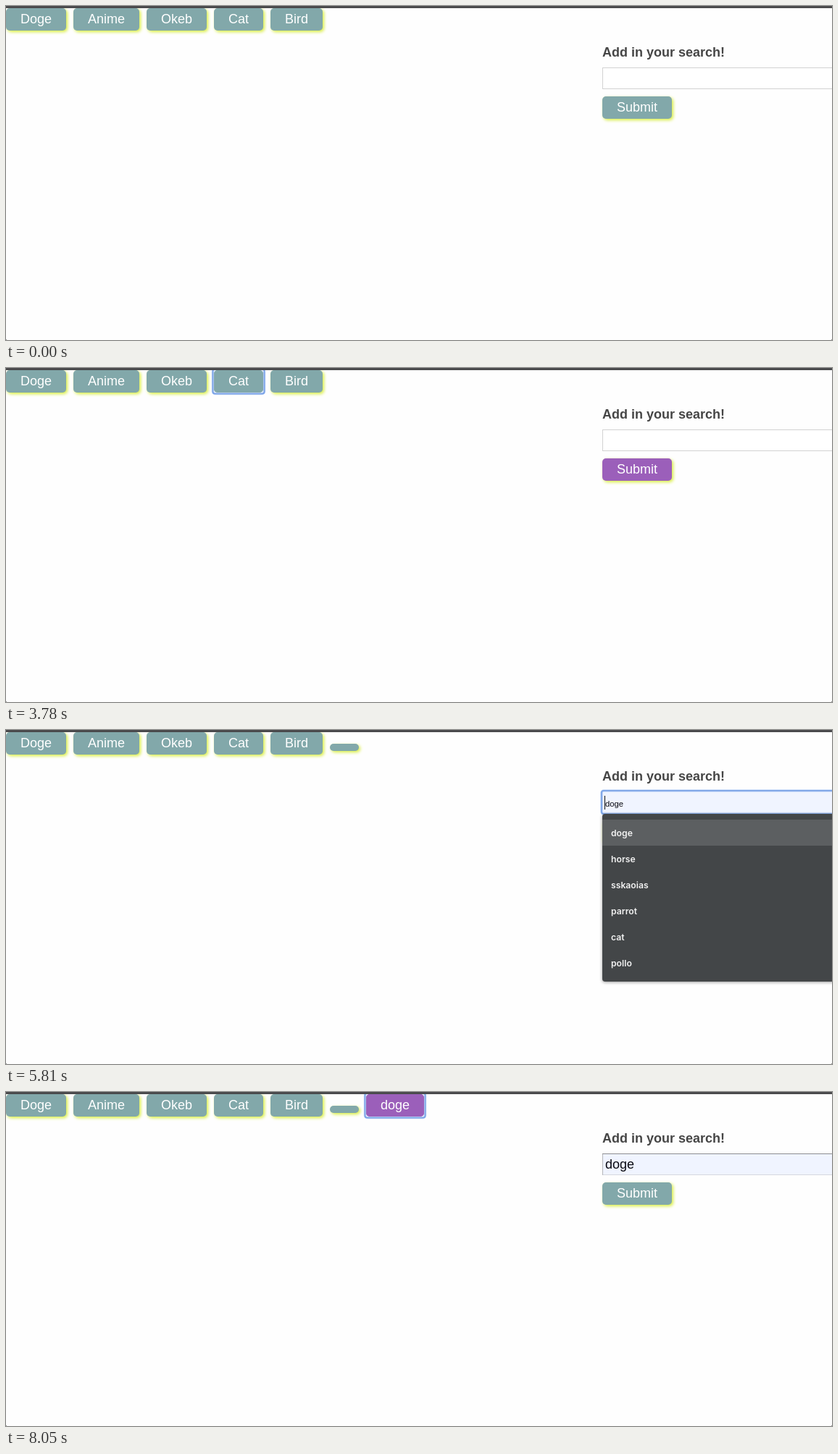
An HTML page with a canvas that plays this animation: 1140x462 px, repeating every 8120 ms.

```html
<!DOCTYPE html>
<html lang="en">
<head>
<meta charset="utf-8">
<title>Search tags</title>
<style>
  html, body { margin: 0; width: 100%; height: 100%; overflow: hidden; background: #fefefe; }
  canvas { display: block; }
</style>
</head>
<body>
<canvas id="stage" width="1140" height="462"></canvas>
<script>
const ctx = document.getElementById('stage').getContext('2d');
const W = 1140, H = 462, LOOP = 8120;
const SANS = '"Liberation Sans", Arial, sans-serif';
const MENU_FONT = '600 12.2px Inter, sans-serif';

const TAGS = [
  ['Doge', 0, 83], ['Anime', 93, 91], ['Okeb', 194, 83], ['Cat', 287, 68], ['Bird', 365, 72]
];
const OPTIONS = ['doge', 'horse', 'sskaoias', 'parrot', 'cat', 'pollo'];

// Moments of the session, in ms
const T = {
  catHover: 2170, catLeave: 2730,
  submitHover: 3780, blankAdded: 4200, submitLeave: 4760,
  inputFocus: 4830, menuOpen: 4900, caretOff: 5320, preview: 5600, picked: 5880,
  submitHover2: 6230, dogeAdded: 6440, submitLeave2: 6720,
  dogeHover: 7140, dogeFocus: 7210
};

function box(x, y, w, h, r, fill) {
  ctx.beginPath();
  ctx.roundRect(x, y, w, h, r);
  ctx.fillStyle = fill;
  ctx.fill();
}

function text(str, x, y, font, color, align = 'left') {
  ctx.font = font;
  ctx.fillStyle = color;
  ctx.textAlign = align;
  ctx.fillText(str, x, y);
}

function ring(x, y, w, h) {
  const edge = (grow, width, color) => {
    ctx.beginPath();
    ctx.roundRect(x - grow, y - grow, w + 2 * grow, h + 2 * grow, 3);
    ctx.lineWidth = width;
    ctx.strokeStyle = color;
    ctx.stroke();
  };
  edge(1.5, 3.5, 'rgba(150,185,242,0.55)');
  edge(1.6, 1.8, '#7ba3e6');
}

function button(label, x, y, w, h, hover, focus) {
  ctx.save();
  if (!focus) {
    ctx.shadowColor = '#d9ee42';
    ctx.shadowOffsetX = ctx.shadowOffsetY = 2;
    ctx.shadowBlur = 4;
  }
  const fill = hover ? '#9b5fba' : '#82a8aa';
  box(x, y, w, h, 5, fill);
  ctx.restore();
  if (focus) {
    ring(x, y, w, h);
    box(x, y, w, h, 5, fill);
  }
  text(label, x + w / 2, y + 21, '18px ' + SANS, '#fff', 'center');
}

function input(t) {
  const between = (a, b) => t >= a && t < b;
  const focus = between(T.inputFocus, T.dogeAdded);
  const filled = t >= T.preview;
  const x = 823, y = 85, w = 340, h = 30;

  ctx.fillStyle = filled ? '#f0f4ff' : '#fff';
  ctx.fillRect(x, y, w, h);
  if (focus) {
    ring(x + 0.5, y + 0.5, w, h - 1);
    ctx.fillStyle = filled ? '#f0f4ff' : '#fff';
    ctx.fillRect(x + 1, y + 2, w, h - 3);
  } else {
    ctx.fillStyle = filled ? '#d5d8df' : '#d2d2d2';
    ctx.fillRect(x, y + h - 1, w, 1);
    ctx.fillStyle = filled ? '#b4b6ba' : '#d2d2d2';
    ctx.fillRect(x, y, 1, h);
    ctx.fillStyle = filled ? '#8c8d90' : '#d2d2d2';
    ctx.fillRect(x, y, w, 1);
  }

  const chosen = t >= T.picked;
  if (filled) text('doge', 827, 106, (chosen ? '18px ' : '11.3px ') + SANS, '#0a0a12');
  if (focus && !between(T.caretOff, T.preview)) {
    ctx.fillStyle = '#111';
    ctx.fillRect(chosen ? 867 : 826, 91, 1, 19);
  }
}

function menu(highlight) {
  ctx.save();
  ctx.shadowColor = 'rgba(0,0,0,0.4)';
  ctx.shadowOffsetY = 1;
  ctx.shadowBlur = 4;
  box(823, 116, 340, 232, 4, '#434648');
  ctx.restore();
  if (highlight) {
    ctx.fillStyle = '#5c5f61';
    ctx.fillRect(823, 124, 340, 36);
  }
  OPTIONS.forEach((name, i) => text(name, 835, 147 + 36 * i, MENU_FONT, '#f2f2f2'));
}

function draw(t) {
  const between = (a, b) => t >= a && t < b;
  ctx.fillStyle = '#fefefe';
  ctx.fillRect(0, 0, W, H);

  for (const [label, x, w] of TAGS) {
    const cat = label === 'Cat';
    button(label, x, 3, w, 31,
      cat && between(T.catHover, T.catLeave),
      cat && between(T.catHover, T.blankAdded));
  }
  if (t >= T.blankAdded) button('', 447, 19, 40, 10, false, false);
  if (t >= T.dogeAdded) button('doge', 497, 3, 80, 31, t >= T.dogeHover, t >= T.dogeFocus);

  ctx.fillStyle = '#4a4a4c';
  ctx.fillRect(0, 0, W, 3);

  text('Add in your search!', 823, 70, 'bold 18px ' + SANS, '#464646');
  button('Submit', 823, 125, 96, 31,
    between(T.submitHover, T.submitLeave) || between(T.submitHover2, T.submitLeave2),
    between(T.blankAdded, T.inputFocus) || between(T.dogeAdded, T.dogeFocus));
  input(t);
  if (between(T.menuOpen, T.picked)) menu(t >= T.preview);

  // Window corners
  ctx.fillStyle = '#8a8a8a';
  ctx.fillRect(0, H - 1, 1, 1);
  ctx.fillRect(W - 1, H - 1, 1, 1);
}

const start = performance.now();
function tick() {
  draw((performance.now() - start) % LOOP);
  requestAnimationFrame(tick);
}
tick();
</script>
</body>
</html>
```
